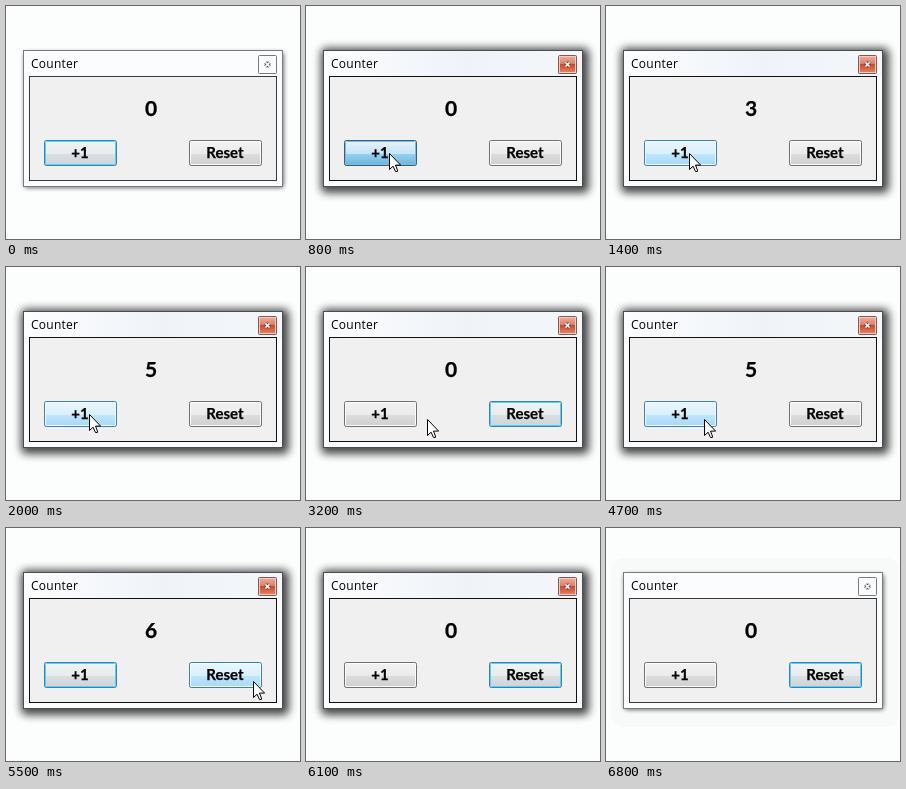
Write an HTML page that moves like this. It is 294 by 233 pixels and loops after 6.9 s.

```html
<!DOCTYPE html>
<html lang="en">
<head>
<meta charset="utf-8">
<title>Counter</title>
<style>
  html, body { margin: 0; width: 100%; height: 100%; overflow: hidden; background: #fcfefd; }
  svg { display: block; width: 294px; height: 233px; }
  text { fill: #000; }
  .title { font: 12px "Open Sans", "Noto Sans", sans-serif; letter-spacing: .25px; }
  .label, .count { text-anchor: middle; stroke: #000; stroke-width: .25px; }
  .label { font: bold 15px Lato, sans-serif; }
  .count { font: bold 21px Lato, sans-serif; }
</style>
</head>
<body>
<svg viewBox="0 0 294 233" xmlns="http://www.w3.org/2000/svg">
  <defs>
    <filter id="wide" x="-20%" y="-30%" width="140%" height="160%"><feGaussianBlur stdDeviation="4.5"/></filter>
    <filter id="tight" x="-20%" y="-30%" width="140%" height="160%"><feGaussianBlur stdDeviation="2.2"/></filter>
    <linearGradient id="glass">
      <stop offset="0" stop-color="#fcfdfe"/><stop offset=".55" stop-color="#eff3f8"/>
      <stop offset="1" stop-color="#f5f7fa"/>
    </linearGradient>
    <linearGradient id="red" x2="0" y2="1">
      <stop offset="0" stop-color="#eeb0a0"/><stop offset=".5" stop-color="#dd7a62"/>
      <stop offset=".5" stop-color="#cb4a2c"/><stop offset="1" stop-color="#e48a68"/>
    </linearGradient>
  </defs>
  <rect id="halo" x="5" y="30" width="288" height="169" rx="13" fill="#f8f9f9"/>
  <rect id="shadowOn" x="15" y="42" width="268" height="145" rx="5" opacity=".72" filter="url(#wide)"/>
  <rect id="shadowOff" x="18" y="46" width="260" height="136" rx="4" opacity=".55" filter="url(#tight)"/>
  <rect id="frame" x="17.5" y="44.5" width="259" height="136" fill="#fbfcfe"/>
  <rect id="bar" x="18" y="45" width="258" height="26" fill="url(#glass)"/>
  <text class="title" x="25" y="62">Counter</text>
  <rect id="close" x="252.5" y="49.5" width="18" height="18" rx="1"/>
  <g fill="none">
    <rect id="closeRim" x="253.5" y="50.5" width="16" height="16" stroke="#f3cabd"/>
    <path id="crossEdge" d="M259.5 56.5l4 4m0-4l-4 4" stroke-width="3.8"/>
    <path d="M259.5 56.5l4 4m0-4l-4 4" stroke="#fff" stroke-width="1.7"/>
  </g>
  <rect id="client" x="23.5" y="70.5" width="247" height="104" fill="#f0f0f0"/>
  <text id="count" class="count" x="145" y="110">0</text>
  <g id="buttons"></g>
  <path id="cursor" d="M.5 .5V16.5L4.1 13.2L6.5 18.5H8.4V17L6.5 12.1H11.6Z" fill="#fff" stroke="#000" stroke-linejoin="round"/>
</svg>
<script>
const LOOP = 6900, STEP = 100;
const NS = "http://www.w3.org/2000/svg";
const $ = id => document.getElementById(id);

function set(el, attrs) {
  for (const k in attrs) el.setAttribute(k, attrs[k]);
}
function add(parent, tag, attrs) {
  const el = document.createElementNS(NS, tag);
  set(el, attrs);
  return parent.appendChild(el);
}
const show = (el, on) => set(el, { visibility: on ? "visible" : "hidden" });

// Glossy fills (four stops with a hard middle) and edge colours
const LOOKS = {
  normal: { stops: ["#f2f2f2", "#ebebeb", "#dddddd", "#cfcfcf"], edge: "#707070", inner: "#fcfcfc" },
  focus: { stops: ["#f0f2f3", "#e9ecee", "#dadfe2", "#ccd4d9"], edge: "#3c7fb1", inner: "#4fd3f7" },
  hot: { stops: ["#eaf6fd", "#d9f0fc", "#bee6fd", "#a7d9f5"], edge: "#3c7fb1", inner: "#f4fbfe" },
  pressed: { stops: ["#e5f4fc", "#c4e5f6", "#98d1ef", "#68b3db"], edge: "#2c628b", inner: "#8fb5cb" }
};
for (const name in LOOKS) {
  const grad = add(document.querySelector("defs"), "linearGradient", { id: name, x2: 0, y2: 1 });
  LOOKS[name].stops.forEach((c, i) => add(grad, "stop", { offset: [0, .54, .54, 1][i], "stop-color": c }));
}

function makeButton(x, label) {
  const g = add($("buttons"), "g", { transform: `translate(${x} 134)` });
  const face = add(g, "rect", { x: .5, y: .5, width: 72, height: 25, rx: 1.8 });
  const inner = add(g, "rect", { x: 1.5, y: 1.5, width: 70, height: 23, rx: 1, fill: "none" });
  add(g, "text", { class: "label", x: 36, y: 18 }).textContent = label;
  return { x, face, inner };
}
const plus = makeButton(38, "+1");
const reset = makeButton(183, "Reset");

// The hand glides between a few resting points, slowing down on arrival
const START = { x: 284, y: 153 };
const MOVES = [
  { from: 200, to: 700, x: 83, y: 147 },
  { from: 2200, to: 2600, x: 243, y: 152 },
  { from: 2900, to: 3400, x: 98, y: 152 },
  { from: 5000, to: 5500, x: 247, y: 153 },
  { from: 5900, to: 6100, x: 284, y: 153 }
];
const easeOut = p => 1 - (1 - p) ** 2;

function tipAt(t) {
  return MOVES.reduce((at, m) => {
    const p = easeOut(Math.min(1, Math.max(0, (t - m.from) / (m.to - m.from))));
    return { x: Math.round(at.x + (m.x - at.x) * p), y: Math.round(at.y + (m.y - at.y) * p) };
  }, START);
}

// Held clicks stay down for one step; quick ones count at once
const clicks = (button, hold, times) => times.map(at => ({ button, at, end: at + hold }));
const CLICKS = [
  ...clicks(plus, STEP, [800, 1100, 1600, 1900, 3600, 4100, 4300, 4600]),
  ...clicks(plus, 0, [1400, 3900, 4900]),
  ...clicks(reset, STEP, [2800, 5700])
].sort((a, b) => a.at - b.at);

function stateAt(t) {
  const state = { count: 0, focused: plus, down: false };
  for (const c of CLICKS) {
    if (t < c.at) break;
    state.focused = c.button;
    state.down = t < c.end;
    if (!state.down) state.count = c.button === plus ? state.count + 1 : 0;
  }
  return state;
}

function paint(button, tip, { down, focused }) {
  const over = tip.x >= button.x && tip.x < button.x + 73 && tip.y >= 134 && tip.y < 160;
  const name = over ? (down ? "pressed" : "hot") : focused === button ? "focus" : "normal";
  set(button.face, { fill: `url(#${name})`, stroke: LOOKS[name].edge });
  set(button.inner, { stroke: LOOKS[name].inner });
}

function draw(ms) {
  const t = Math.floor((ms % LOOP) / STEP) * STEP;
  const active = t >= 200 && t < 6800;
  const tip = tipAt(t);
  const state = stateAt(t);

  show($("halo"), t >= 6800);
  show($("shadowOn"), active);
  show($("shadowOff"), !active);
  show($("bar"), active);
  show($("closeRim"), active);
  set($("frame"), { stroke: active ? "#4a4d52" : "#777a7e" });
  set($("client"), { stroke: active ? "#111" : "#3a3a3a" });
  set($("close"), { fill: active ? "url(#red)" : "#fafbfc", stroke: active ? "#7d5a56" : "#77797c" });
  set($("crossEdge"), { stroke: active ? "#7c4a42" : "#5d6066" });
  $("count").textContent = state.count;
  paint(plus, tip, state);
  paint(reset, tip, state);
  set($("cursor"), { transform: `translate(${tip.x} ${tip.y})` });
  show($("cursor"), tip.x < 277);
}

const start = performance.now();
function tick() {
  draw(performance.now() - start);
  requestAnimationFrame(tick);
}
tick();
</script>
</body>
</html>
```
